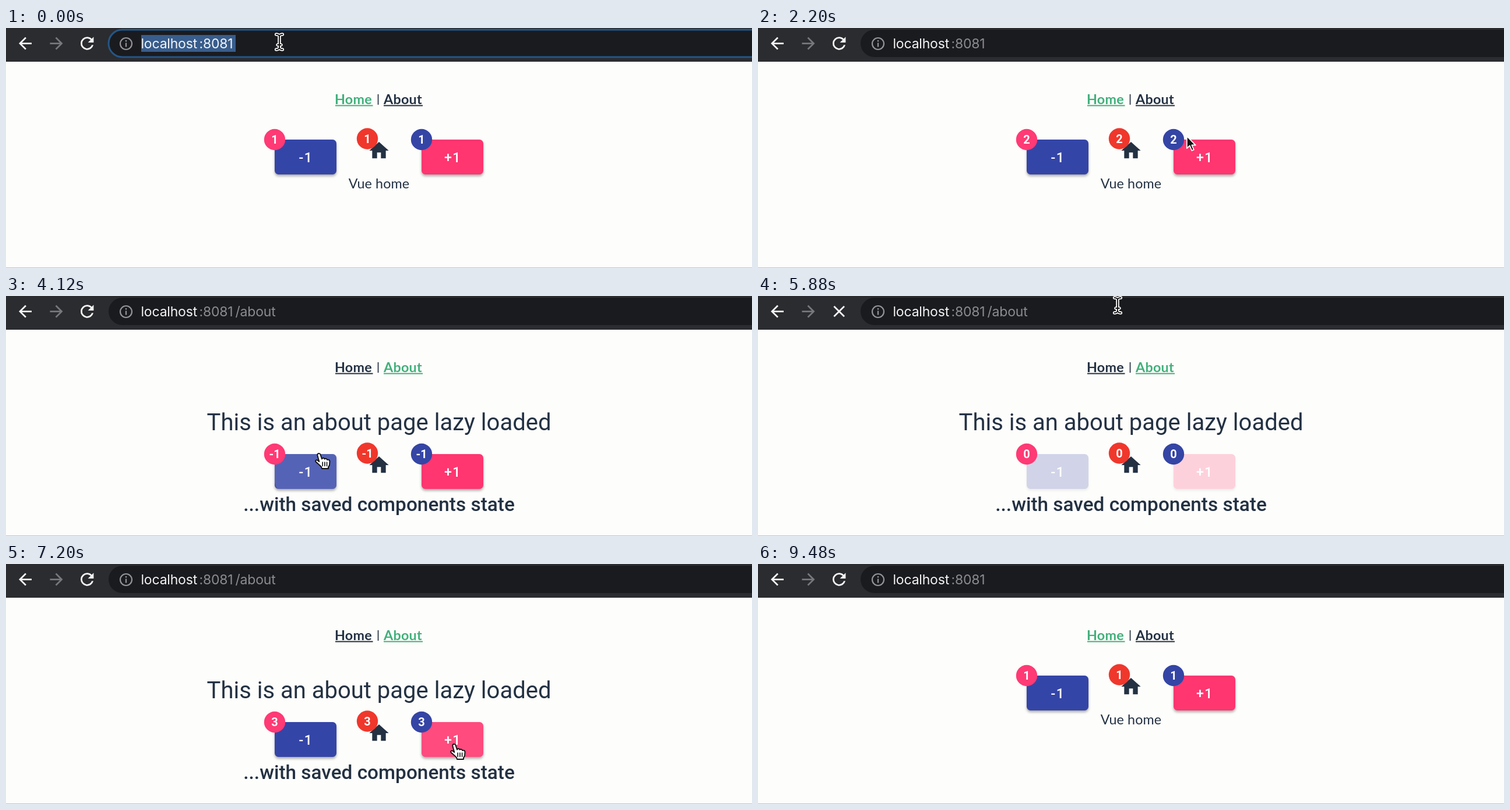
An HTML page that plays this animation: 1280x413 px, repeating every 9840 ms.

```html
<!DOCTYPE html>
<html lang="en">
<head>
<meta charset="utf-8">
<title>Counter demo</title>
<style>
  html, body { margin: 0; width: 100%; height: 100%; overflow: hidden; background: #fdfdfb; }
  svg { display: block; width: 100vw; height: 100vh; }
  text { white-space: pre; }
  .url { font: 400 23px Inter, sans-serif; letter-spacing: -.2px; fill: #8b8c90; }
  .nav { font: 700 23.3px Lato, sans-serif; letter-spacing: .25px; }
  .thin { font: 400 23.3px Lato, sans-serif; letter-spacing: .1px; fill: #233143; }
  .h1 { font: 400 40px Roboto, sans-serif; fill: #233143; }
  .h3 { font: 500 33.33px Roboto, sans-serif; fill: #233143; }
  .label { font: 500 23.3px Roboto, sans-serif; letter-spacing: 1.5px; fill: #fff; }
  .badge { font: 700 20px Roboto, sans-serif; fill: #fff; }
  .mid { text-anchor: middle; }
  .face { filter: drop-shadow(0 3px 2px rgba(0, 0, 0, .32)); }
  .hand, .arrow { stroke-linejoin: round; stroke-linecap: round; }
</style>
</head>
<body>
<svg viewBox="0 0 1280 413" preserveAspectRatio="none">
  <defs><clipPath id="shape"><rect width="106" height="60" rx="6.5"/></clipPath></defs>
  <rect width="1280" height="413" fill="#fdfdfb"/>
  <rect y="412" width="1280" height="1" fill="#c6c0ae"/>

  <g id="toolbar">
    <rect width="1280" height="58" fill="#2b2c2f"/>
    <rect id="field" x="176" y="3" width="1300" height="47" rx="23.5" fill="#1a1b1f"/>
    <rect id="ring" x="176" y="3" width="1300" height="47" rx="23.5" fill="none" stroke="#245686" stroke-width="3"/>
    <path transform="translate(16.5 10) scale(1.375)" fill="#f4f4f5" d="M20 11H7.83l5.59-5.59L12 4l-8 8 8 8 1.41-1.41L7.83 13H20z"/>
    <path transform="translate(103 10) scale(-1.375 1.375)" fill="#77787c" d="M20 11H7.83l5.59-5.59L12 4l-8 8 8 8 1.41-1.41L7.83 13H20z"/>
    <g transform="translate(122.4 9.7) scale(1.4)" fill="#f4f4f5">
      <path id="reload" d="M17.65 6.35A7.95 7.95 0 0 0 12 4a8 8 0 1 0 7.73 10h-2.08A6 6 0 1 1 12 6c1.66 0 3.14.69 4.22 1.78L13 11h7V4z"/>
      <path id="stop" d="M19 6.41 17.59 5 12 10.59 6.41 5 5 6.41 10.59 12 5 17.59 6.41 19 12 13.41 17.59 19 19 17.59 13.41 12z"/>
    </g>
    <circle cx="206" cy="27" r="10" fill="none" stroke="#939498" stroke-width="2.2"/>
    <path d="M206 25.5v7M206 21v2.4" stroke="#939498" stroke-width="2.3"/>
    <rect id="selection" x="232" y="12" width="162" height="29" fill="#385d8c"/>
    <text class="url" x="231.5" y="35" style="fill:#f4f4f5">localhost</text>
    <text class="url" id="port" x="331.5" y="35">:8081</text>
    <text class="url" id="path" x="393.5" y="35">/about</text>
  </g>

  <g id="page">
    <g id="home"><text class="nav" x="564" y="131">Home</text><rect x="565" y="132.5" width="64.5" height="2"/></g>
    <rect x="637.7" y="114" width="1.7" height="18" fill="#233143"/>
    <g id="about"><text class="nav" x="648" y="131">About</text><rect x="648" y="132.5" width="67" height="2"/></g>
    <text class="thin mid" id="homeText" x="640" y="276">Vue home</text>
    <g id="aboutText">
      <text class="h1 mid" x="640" y="231">This is an about page lazy loaded</text>
      <text class="h3 mid" x="640" y="370">...with saved components state</text>
    </g>
    <g id="counter">
      <path transform="translate(620 191) scale(1.6667)" fill="#233143" d="M10 20v-6h4v6h5v-8h3L12 3 2 12h3v8z"/>
    </g>
  </g>

  <g id="cursor">
    <g class="hand" id="hand" stroke="#111" fill="none">
      <path fill="#fff" stroke-width="1.9" d="M-3.7 3C-4-.8.7-1 1.5 2L4 9.5C5 7 8 7.5 8.5 9.5 10 8 13 9 13 11c2-1 4.5 0 4.5 2.5L17 20l-2 3.5V26H4l-1-3C0 20-3 17-6.3 14.5-8 12-5.5 10.3-3 12l2.3 2Z"/>
      <path stroke-width="1.6" d="M5.2 15v6.5M8.9 15v6.5M12.6 15v6.5"/>
    </g>
    <g id="beam" fill="none" stroke-linecap="round">
      <path id="beamPath" stroke="#fff" stroke-width="5" d="M-5.5-13Q-1-13 0-10 1-13 5.5-13M0-10V10M-5.5 13Q-1 13 0 10 1 13 5.5 13M-3 5H3"/>
      <use href="#beamPath" id="beamCore"/>
      <path stroke="#111" stroke-width="1.9" d="M-5.5-13Q-1-13 0-10 1-13 5.5-13M0-10V10M-5.5 13Q-1 13 0 10 1 13 5.5 13M-3 5H3"/>
    </g>
    <path class="arrow" id="arrow" fill="#111" stroke="#fff" stroke-width="1.8" d="M0 0V21l5-4.5L8.5 25l3.5-1.5-3.5-8H15Z"/>
  </g>
</svg>
<script>
const LOOP = 9840, STEP = 40, SHIFT = 80;
const INK = '#233143', GREEN = '#41b07b', BLUE = '#3445a8', PINK = '#ff3670';

// time, x, y of the pointer
const TRACK = [
  [0, 469, 24], [880, 469, 24], [1400, 757, 251], [1560, 765, 236], [1960, 765, 236],
  [2480, 699, 123], [3080, 699, 123], [3480, 530, 300], [3960, 535, 294], [4120, 538, 271],
  [4560, 617, 16], [5920, 617, 16], [6440, 768, 306], [7200, 770, 310], [7600, 598, 126],
  [7840, 598, 126], [8240, 515, 232], [8840, 515, 232], [9440, 1300, 130]
];
// time, amount added
const CLICKS = [
  [1640, 1], [1800, 1], [3560, -1], [3760, -1], [3960, -1],
  [6560, 1], [6760, 1], [6960, 1], [8360, -1], [8640, -1]
];
// focus, enter, blank, painted, finished
const VISITS = [
  { focus: 0, enter: 400, blank: 640, paint: 880, done: 1000 },
  { focus: 4920, enter: 5440, blank: 5640, paint: 5840, done: 6000 }
];
const ABOUT_FROM = 2640, ABOUT_TO = 7680;

const $ = id => document.getElementById(id);
const show = (id, on) => $(id).style.display = on ? '' : 'none';
const within = (t, a, b) => t >= a && t < b;
const clamp = v => Math.max(0, Math.min(1, v));

function add(parent, tag, attrs, text = '') {
  const el = document.createElementNS('http://www.w3.org/2000/svg', tag);
  for (const key in attrs) el.setAttribute(key, attrs[key]);
  el.textContent = text;
  return parent.appendChild(el);
}

function makeButton(x, color, label, sign) {
  const g = add($('counter'), 'g', { transform: `translate(${x} 192)` });
  const face = add(g, 'rect', { class: 'face', width: 106, height: 60, rx: 6.5, fill: color });
  const inner = add(g, 'g', { 'clip-path': 'url(#shape)' });
  const hover = add(inner, 'rect', { width: 106, height: 60, fill: '#fff' });
  const ripple = add(inner, 'circle', { fill: '#fff' });
  add(g, 'text', { class: 'label mid', x: 53.5, y: 38.5 }, label);
  return { x, sign, face, hover, ripple };
}

function makeBadge(x, y, color) {
  add($('counter'), 'circle', { cx: x, cy: y, r: 18.2, fill: color });
  return add($('counter'), 'text', { class: 'badge mid', x, y: y + 7.3 });
}

const buttons = [makeButton(461, BLUE, '-1', -1), makeButton(713, PINK, '+1', 1)];
const badges = [makeBadge(461, 192, '#ff3a74'), makeBadge(620, 190.5, '#f0372c'), makeBadge(713, 192, '#3445a5')];

function pointerAt(t) {
  const i = TRACK.findIndex(p => p[0] > t);
  if (i < 0) return TRACK[TRACK.length - 1].slice(1);
  const [t0, x0, y0] = TRACK[i - 1], [t1, x1, y1] = TRACK[i];
  const u = (t - t0) / (t1 - t0), k = u * u * (3 - 2 * u);
  return [x0 + (x1 - x0) * k, y0 + (y1 - y0) * k];
}

function countAt(t) {
  const loaded = VISITS.filter(v => v.paint <= t).pop();
  const start = loaded ? loaded.paint : 0;
  return CLICKS.reduce((n, [at, by]) => within(at, start, t + 1) ? n + by : n, loaded ? 0 : 1);
}

function drawButton(b, t, x, y, top, opacity) {
  const over = within(x, b.x, b.x + 106) && within(y, top - 2, top + 60);
  b.face.setAttribute('opacity', opacity);
  b.hover.setAttribute('opacity', over ? .06 : 0);
  const click = CLICKS.filter(([at, by]) => at <= t && by === b.sign).pop();
  const age = click ? t - click[0] : 1e4;
  const [cx, cy] = click ? pointerAt(click[0]) : [0, 0];
  b.ripple.setAttribute('cx', cx - b.x);
  b.ripple.setAttribute('cy', cy - top);
  b.ripple.setAttribute('r', 15 + 90 * clamp(age / 225));
  b.ripple.setAttribute('opacity', .14 * clamp((300 - age) / 180));
  return over;
}

function render(t) {
  const about = within(t, ABOUT_FROM, ABOUT_TO);
  const focused = VISITS.some(v => within(t, v.focus, v.enter));
  const loading = VISITS.some(v => within(t, v.enter, v.done));
  const blank = VISITS.some(v => within(t, v.blank, v.paint));
  const painted = VISITS.filter(v => v.paint <= t).pop();
  const opacity = painted ? clamp((t - painted.paint + 25) / 300) : 1;
  const shift = about ? SHIFT : 0;

  show('ring', focused);
  show('selection', focused);
  $('selection').setAttribute('width', about ? 231 : 162);
  for (const id of ['port', 'path']) $(id).style.fill = focused ? '#f4f4f5' : '';
  show('path', about);
  show('stop', loading);
  show('reload', !loading);

  show('page', !blank);
  $('home').setAttribute('fill', about ? INK : GREEN);
  $('about').setAttribute('fill', about ? GREEN : INK);
  show('homeText', !about);
  show('aboutText', about);
  $('counter').setAttribute('transform', `translate(0 ${shift})`);
  const count = countAt(t);
  badges.forEach(b => b.textContent = count);

  const [x, y] = pointerAt(t);
  const over = buttons.map(b => drawButton(b, t, x, y, 192 + shift, opacity));
  const link = within(y, 112, 138) && (within(x, 564, 630) || within(x, 647, 716));
  const hand = !blank && (link || over.includes(true));
  const beam = y < 56 && x > 180;
  $('cursor').setAttribute('transform', `translate(${x} ${y})`);
  show('hand', hand);
  show('beam', beam);
  show('arrow', !hand && !beam);
}

const begin = performance.now();
function tick() {
  const t = (performance.now() - begin) % LOOP;
  render(Math.floor(t / STEP) * STEP);
  requestAnimationFrame(tick);
}
tick();
</script>
</body>
</html>
```
